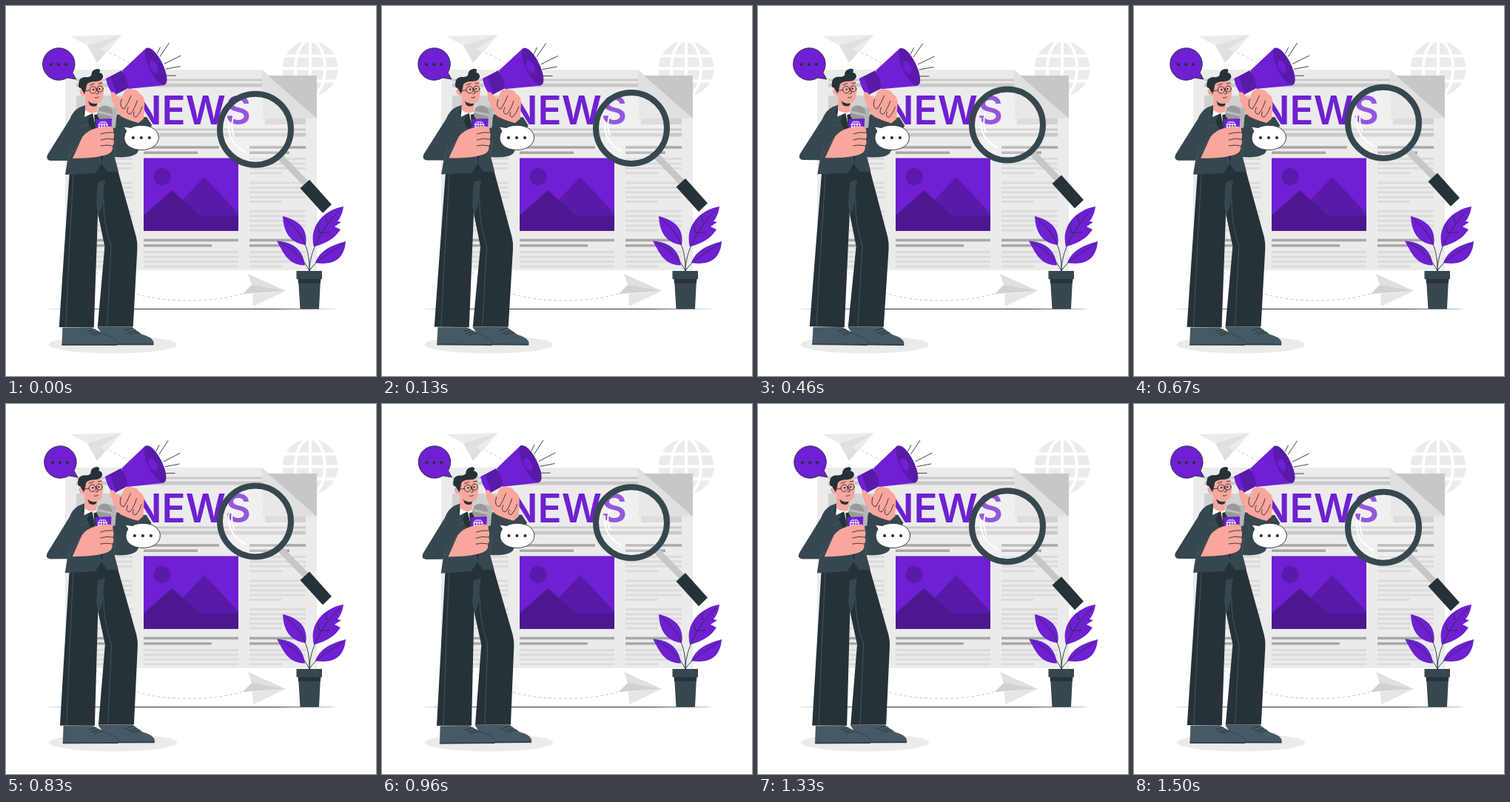
An HTML page that plays this animation: 500x500 px, repeating every 1.54 s.

```html
<!DOCTYPE html>
<html lang="en">
<head>
<meta charset="utf-8">
<title>News reporter</title>
<style>
  html, body { margin: 0; width: 100%; height: 100%; overflow: hidden; background: #fff; }
  svg { display: block; width: 100%; height: 100%; }
  .purple { fill: #6e20d2; }
  .deep { fill: #591aa9; }
  .slate { fill: #37474f; }
  .dark { fill: #263238; }
  .shoe { fill: #455a64; stroke: #263238; stroke-width: .5; }
  .skin { fill: #f9a69c; }
  .pale { fill: #ebebeb; }
  .grey { fill: #c7c7c7; }
  .ink { fill: none; stroke: #263238; stroke-width: .9; stroke-linecap: round; stroke-linejoin: round; }
  .seam { fill: none; stroke: #455a64; stroke-width: .9; }
  .dash { fill: none; stroke: #c4c4c4; stroke-width: 1; stroke-dasharray: 3.5 3.5; }
  .white { fill: none; stroke: #fff; }
</style>
</head>
<body>
<svg viewBox="0 0 500 500">
  <g class="pale" transform="translate(411 84.500)">
    <circle r="37.500"/>
    <path class="white" stroke-width="4" d="M0-38V38M-38 0H38M-34-17H34M-34 17H34"/>
    <ellipse class="white" stroke-width="4" rx="20" ry="38"/>
  </g>

  <path class="dash" d="M133 60Q152 68 168 78"/>
  <path class="pale" d="M86 41L156 39L110 53Z"/>
  <path fill="#e0e0e0" d="M110 53L156 39L123 77Z"/>
  <path class="pale" d="M126 59L156 39L137 63Z"/>

  <path class="pale" d="M80 86H346L420 152V357H80Z"/>
  <path fill="#d1d1d1" d="M95 121H171V160H95ZM350 121H405V160H350Z"/>
  <path fill="none" stroke="#c9c9c9" stroke-width="3" d="M95 100H347M95 167H405"/>
  <path fill="none" stroke="#c9c9c9" stroke-width="5" d="M95 107H347M95 174H405"/>
  <path id="lightLines" fill="none" stroke="#dbdbdb" stroke-width="3"/>
  <path id="darkLines" fill="none" stroke="#a8a8a8" stroke-width="3.500"/>
  <path fill="#e0e0e0" d="M346 86L420 152H347Z"/>
  <path class="grey" d="M354 94H420V152Z"/>
  <text class="purple" x="331" y="160" text-anchor="end" font-family="Inter, sans-serif" font-weight="600" font-size="53">NEWS</text>

  <path class="purple" d="M186 205.500H314V304H186Z"/>
  <circle class="deep" cx="211" cy="230.500" r="11.500"/>
  <path class="deep" d="M220 281L268 231.500L314 280V304H220Z"/>
  <path fill="#4d1792" d="M186 283L224 249L262 283H314V304H186Z"/>

  <path class="dash" d="M122 360Q165 398 245 398Q292 398 322 388"/>
  <path fill="#e0e0e0" d="M327 362L378 385L320 389L332 377Z"/>
  <path fill="#d2d2d2" d="M332 377L378 385L320 389Z"/>
  <path fill="#e6e6e6" d="M333 389L378 385L334 406Z"/>

  <path class="dark" d="M50 409.400L150 408.900H360L453 409.400L360 409.900H150Z"/>
  <ellipse class="pale" cx="144.500" cy="457.500" rx="86.500" ry="12"/>

  <g id="plant">
    <path class="purple" d="M416 325C409 296 431 275 456 271C455 279 452 286 448 291L453 292L444 298L452 302C444 315 430 322 416 325ZM374 284C394 289 409 300 405 323C384 320 375 306 374 284ZM366 317.500C386 319 401 327 404 350.500C382 350 376 336 366 317.500ZM459 318C438 324 424 331 418 347C436 350 457 347 459 318Z"/>
    <path class="ink" stroke-width=".7" d="M410 358C410 332 426 300 451 276M410 358C411 325 398 305 379 289M410 358C402 341 388 328 371 320M410 358C418 344 438 333 455 322M424 306L421 296M434 292L432 284M424 306L437 306"/>
    <path class="slate" d="M392.500 358H427V369H425L423 409.500H397.500L395 369H392.500Z"/>
    <path class="dark" d="M394.500 369H425.500L425 374.500H395Z"/>
  </g>

  <g id="man">
    <path class="shoe" d="M124 434H170L184 444Q198 448 199.500 454V458H140Z"/>
    <path class="shoe" d="M77 435H116L136 445Q150 449 151 455L150 458.500H76Z"/>
    <path class="ink" d="M76 457.500H150M152 457H199M111 440L121 437M114 443L125 440M118 445L129 442M160 439L171 435M164 442L175 439M168 444L180 441"/>
    <path class="dark" d="M88 212L123 212L124 285L119 434.500L72 434Q78 340 86 222ZM122 212H148L151 222L176 312Q178 320 177.500 328L172 433.500H124L133.500 325L122 270Z"/>
    <path class="slate" d="M124 238L134 235Q131 252 132 262L125 285L122 268Z"/>
    <path class="seam" d="M91 228Q85 330 81 433M132 262Q131 290 142 325L137 432"/>

    <path class="slate" d="M150 146L166 151L190 150L197 161L177 199Q169 206 146 204Z"/>
    <path class="slate" d="M107 134L99 137Q90 142 86 153L56 201Q53 208 60 209L83 209L80 228L121 226L129 213L137 224L152 224L147 205L152 150L134 141Z"/>
    <path class="dark" d="M107 137L103 145L113 149L110 156L126 190L129 213L139 160L128 140Z"/>
    <path fill="#fff" d="M107 135L106 150L117 145L124 178L130 156L126 139Z"/>
    <path class="dark" d="M119 147L124 146L127 153L124 176L120 160Z"/>
    <path class="seam" d="M128 213L125 190M83 209L101 180M84 205L88 191M103 163L111 160M146 204L149 180"/>

    <path class="skin" d="M107 120L107 141Q116 147 123 143L124 128Z"/>
    <path class="dark" d="M110 126L113 134Q117 137 122 135L125 128Z"/>
    <path class="skin" d="M105 104Q117 98 130 102L132 116L130 126Q126 133 118 132Q109 130 106 121Q100 122 99 115Q101 110 105 113Z"/>
    <path class="dark" d="M104 116L101 111Q97 111 98 105Q98 97 106 96Q112 97 115 94Q115 86 123 85Q129 85 126 90Q131 91 131 96Q129 102 121 102Q112 102 109 106Q108 113 106 119Z"/>
    <circle class="ink" cx="117.500" cy="113.500" r="4.700"/>
    <circle class="ink" cx="127" cy="112" r="4"/>
    <path class="ink" d="M106 115L113 114M121 112L123 112M113 107L119 105M125 105L130 104M123 113L125 118L122 119M120 124Q123 125 125 123"/>
    <circle class="dark" cx="118" cy="113" r="1.200"/>
    <circle class="dark" cx="126" cy="112" r="1.200"/>

    <path class="purple" d="M157 87L190 56L214 107L165 112Z"/>
    <path class="deep" d="M135 98L156 87Q164 97 165 111L146 121Q137 111 135 98Z"/>
    <path class="purple" d="M135 98L141 95Q145 107 150 119L146 121Q138 113 135 98Z"/>
    <ellipse class="deep" cx="202.500" cy="81.500" rx="27.500" ry="9.500" transform="rotate(64 202.500 81.500)"/>
    <ellipse class="purple" cx="199.500" cy="82" rx="9" ry="5" transform="rotate(64 199.500 82)"/>
    <path class="ink" d="M204 64L208 56M208 68L220 50M214 78L236 67M216 85L235 81.500M217 94L229 94"/>
    <path class="skin" d="M141 117Q146 114 150 122L156 125L160 115Q166 110 171 113Q177 112 181 119Q188 122 187 133L186 152L179 158Q164 154 155 149Q144 138 141 117Z"/>
    <path class="ink" d="M156 126Q152 138 160 139Q165 131 169 121M165 137Q161 146 168 146Q174 139 177 128M173 143Q170 150 176 150Q181 145 184 136"/>

    <path fill="#b5b5b5" d="M140 136L150 138L148 164L141 167Z"/>
    <circle cx="133.500" cy="145" r="10.500" fill="#999"/>
    <path d="M123.500 143L143.500 147.500" stroke="#bdbdbd" stroke-width="3"/>
    <path class="purple" d="M121 153L143 152L142 170H122Z"/>
    <g transform="translate(131 162) scale(.18)" fill="#fff">
      <circle r="37.500"/>
      <path d="M0-38V38M-38 0H38M-32-20H32" stroke="#6e20d2" stroke-width="5"/>
      <ellipse rx="20" ry="38" fill="none" stroke="#6e20d2" stroke-width="5"/>
    </g>
    <path class="skin" d="M90 206L103 177Q110 168 122 165L139 162.500Q146 163 145 171Q147 175 145 180Q147 185 144 189Q145 197 138 200Q124 206 90 206Z"/>
    <path class="ink" d="M144 171Q136 170 128 173M145 180Q136 178 128 181M144 189Q136 187 128 189"/>
  </g>

  <g id="bubbles">
    <path class="purple" stroke="#263238" stroke-width=".9" d="M90 90L95 99L83 97A21.800 21.800 0 1 1 90 90Z"/>
    <path fill="#fff" stroke="#263238" stroke-width=".9" d="M163 169L159 163L169 164.500C181 158 206 161 206.500 178C206 200 160 200 160 178Q160 173 163 169Z"/>
    <path class="ink" style="stroke-width:4.200" d="M61 79h0M71 79h0M81 79h0M172 178h0M183 178h0M194 178h0"/>
  </g>

  <g id="lens">
    <path d="M369 203L408 243" stroke="#c7c7c7" stroke-width="9"/>
    <path class="dark" d="M397.500 246.500L410 235L440 268.500L428 280Z"/>
    <circle cx="337" cy="167" r="48" fill="#fff" fill-opacity=".25" stroke="#37474f" stroke-width="8"/>
    <path class="white" stroke-width="2" stroke-linecap="round" d="M301 158Q299 186 324 198M307 151Q303 165 308 177"/>
  </g>
</svg>
<script>
  const $ = id => document.getElementById(id);
  const line = (x, y, w) => `M${x} ${y}h${w}`;

  // Newspaper columns
  let light = '', dark = '';
  for (const [x, width, short] of [[95, 76, 54], [186, 128, 92], [329, 76, 54]]) {
    const middle = x === 186;
    for (const y of [191, 316.5]) {
      const first = middle && y === 191 ? 102 : width;
      const second = middle && y === 191 ? 73 : short;
      dark += line(x, y, first) + line(x, y + 7.2, second);
    }
    const paragraphs = middle ? [[332.5, 4]] : [[206.5, 4], [239, 5], [277.5, 5], [332.5, 4]];
    for (const [top, count] of paragraphs)
      for (let i = 0; i < count; i++)
        light += line(x, top + i * 6.4, !middle && i === count - 1 ? 44 : width);
  }
  $('lightLines').setAttribute('d', light);
  $('darkLines').setAttribute('d', dark);

  const LOOP = 1540, CYCLE = 1500, STEP = 1000 / 24, LEAD = 27;
  const shake = [0, -1, 2, -4, 4, -4, 4, -4, 2, -1, 0];
  const sway = [0, 1, 0, -1, 0];

  // Linear interpolation through evenly spaced values
  function along(values, phase) {
    const at = phase * (values.length - 1), i = Math.floor(at);
    return values[i] + (values[i + 1] - values[i]) * (at - i);
  }

  function draw(now) {
    // The motion advances at 24 steps a second
    const step = Math.floor((now % LOOP) / STEP + .1);
    const phase = (step * STEP + LEAD) % CYCLE / CYCLE;
    $('man').setAttribute('transform', `rotate(${along(sway, phase)} 146 254)`);
    $('bubbles').setAttribute('transform', `translate(${along(shake, phase)} 0)`);
    $('lens').setAttribute('transform', `translate(0 ${along([0, -10, 0], phase)})`);
  }

  const start = performance.now();
  function tick() {
    draw(performance.now() - start);
    requestAnimationFrame(tick);
  }
  tick();
</script>
</body>
</html>
```
